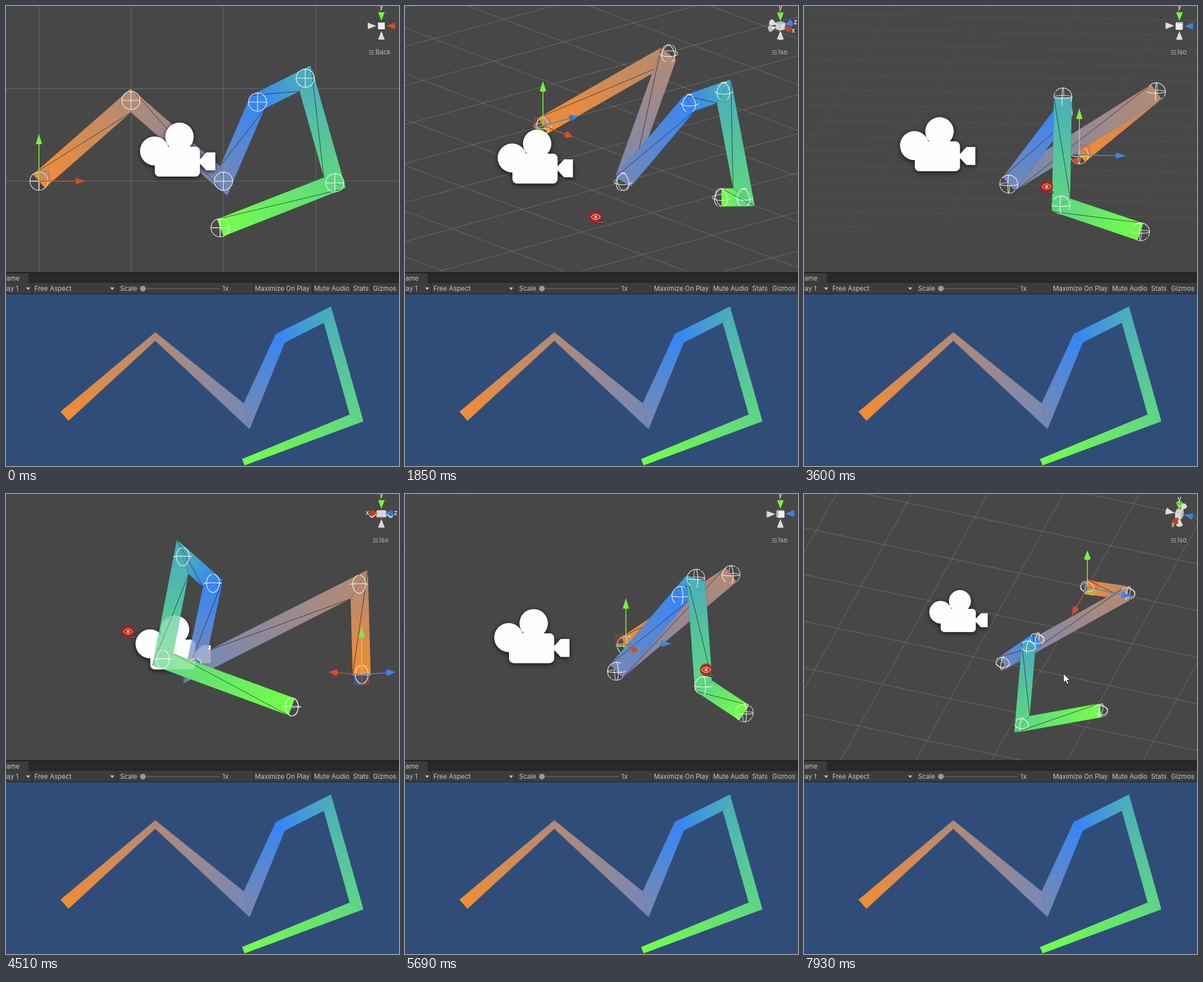
An HTML page with a canvas for the animation above (8 s loop, 692 by 809 pixels).

```html
<!DOCTYPE html>
<html lang="en">
<head>
<meta charset="utf-8">
<title>Line orbit</title>
<style>
html, body { margin: 0; width: 100%; height: 100%; overflow: hidden; background: #282828; }
canvas { display: block; }
</style>
</head>
<body>
<canvas id="stage" width="692" height="809"></canvas>
<script>
const ctx = document.getElementById('stage').getContext('2d');
const LOOP = 8000, CELL = 162.5, CX = 346, CY = 230, NEAR = 505;
const FONT = 'Inter, Roboto, sans-serif';

// World units are pixels at zoom 1; the first point is the origin.
const POINTS = [[0, 0, 0], [162, 142, 153], [325, 0, -91.6], [385, 139, 11],
  [469, 181, 19], [521, -3, 21], [319, -82, 141]];
const PIVOT = [288, 78, -110];
const CAMERA = [244, 55.5, -226];
const AXES = [[1, 0, 0], [0, 1, 0], [0, 0, 1]];
const AXIS_COLORS = ['#d24e28', '#78f23c', '#3f82e6'];
const STOPS = [[242, 140, 52], [55, 134, 245], [115, 255, 72]];

// Pointer stops (time, x, y). While it drags, the pointer turns the view.
const POINTER = [[0, 650, 830], [870, 608, 268], [940, 608, 268], [1850, 336, 371],
  [2200, 240, 347], [2530, 586, 345], [2720, 586, 345], [3530, 443, 321], [4510, 215, 242],
  [4900, 300, 195], [5690, 530, 309], [6000, 677, 490], [6490, 570, 325], [6800, 615, 330],
  [7500, 294, 315], [7900, 457, 316], [LOOP, 457, 316]];
const DRAGS = [[940, 2200], [2720, 6000], [6800, 7500]];
const DEG_PER_PX = .182;

const rad = deg => deg * Math.PI / 180;
const clamp = v => Math.max(0, Math.min(1, v));
const smooth = v => clamp(v) ** 2 * (3 - 2 * clamp(v));
let view;

function slope(i, n) {
  const rise = k => (POINTER[k + 1][n] - POINTER[k][n]) / (POINTER[k + 1][0] - POINTER[k][0]);
  if (i === 0 || i === POINTER.length - 1) return 0;
  const a = rise(i - 1), b = rise(i);
  return a * b > 0 ? 2 * a * b / (a + b) : 0;
}

// Monotone curve through the pointer stops.
function pointerAt(t) {
  const i = Math.max(0, POINTER.findIndex(p => p[0] > t) - 1);
  const a = POINTER[i], b = POINTER[i + 1], span = b[0] - a[0], f = (t - a[0]) / span;
  return [1, 2].map(n => a[n] + (b[n] - a[n]) * smooth(f)
    + span * f * (1 - f) * ((1 - f) * slope(i, n) - f * slope(i + 1, n)));
}

function viewOf(yaw, pitch, zoom) {
  return { yaw, zoom, c: Math.cos(rad(yaw)), s: Math.sin(rad(yaw)),
    cp: Math.cos(rad(pitch)), sp: Math.sin(rad(pitch)) };
}

function viewAt(t) {
  let yaw = 0, pitch = 0;
  for (const [from, to] of DRAGS) {
    if (t <= from) break;
    const a = pointerAt(from), b = pointerAt(Math.min(t, to));
    yaw -= (b[0] - a[0]) * DEG_PER_PX;
    pitch += (b[1] - a[1]) * DEG_PER_PX;
  }
  return viewOf(yaw, pitch, 1 - .224 * smooth((t - 7550) / 350));
}

// Screen x, screen y and nearness of a world direction.
function turn([x, y, z]) {
  const near = x * view.s - z * view.c;
  return [x * view.c + z * view.s, near * view.sp - y * view.cp, near * view.cp + y * view.sp];
}

function project(p) {
  const [x, y, d] = turn(p.map((v, i) => v - PIVOT[i]));
  return [CX + x * view.zoom, CY + y * view.zoom, d];
}

function path(points, closed) {
  ctx.beginPath();
  points.forEach(p => ctx.lineTo(p[0], p[1]));
  if (closed) ctx.closePath();
}

function stroke(points, color, width = 1, closed = false) {
  path(points, closed);
  ctx.strokeStyle = color;
  ctx.lineWidth = width;
  ctx.stroke();
}

function fill(points, color) {
  path(points, true);
  ctx.fillStyle = color;
  ctx.fill();
}

function disc(x, y, r, color) {
  ctx.beginPath();
  ctx.arc(x, y, r, 0, 7);
  ctx.fillStyle = color;
  ctx.fill();
}

function rect(x, y, w, h, color) {
  ctx.fillStyle = color;
  ctx.fillRect(x, y, w, h);
}

function text(str, x, y, align = 'left', size = 11.5, color = '#c6c6c6') {
  ctx.font = `${size}px ${FONT}`;
  ctx.textAlign = align;
  ctx.textBaseline = 'middle';
  ctx.fillStyle = color;
  ctx.fillText(str, x, y);
}

// The gradient spreads evenly over the points.
function pointColor(i) {
  const pos = i / (POINTS.length - 1) * 2, k = Math.min(1, Math.floor(pos));
  return `rgb(${STOPS[k].map((v, n) => Math.round(v + (STOPS[k + 1][n] - v) * (pos - k)))})`;
}

// Left and right rims of a mitred ribbon; sharp turns swap sides.
function ribbon(pts, halfAt) {
  const left = [], right = [];
  let side = 1, prev = null;
  pts.forEach((p, i) => {
    let next = null;
    if (i < pts.length - 1) {
      const dx = pts[i + 1][0] - p[0], dy = pts[i + 1][1] - p[1], len = Math.hypot(dx, dy) || 1;
      next = [side * dy / len, -side * dx / len];
      if (prev && prev[0] * next[0] + prev[1] * next[1] < -.7) {
        side = -side;
        next = [-next[0], -next[1]];
      }
    }
    const a = prev || next, b = next || prev;
    const mx = a[0] + b[0], my = a[1] + b[1];
    const reach = halfAt(i) / (a[0] * mx + a[1] * my);
    left.push([p[0] + mx * reach, p[1] + my * reach]);
    right.push([p[0] - mx * reach, p[1] - my * reach]);
    prev = next;
  });
  return pts.slice(1).map((b, i) => ({ corners: [left[i], left[i + 1], right[i + 1], right[i]],
    draw() {
      const g = ctx.createLinearGradient(pts[i][0], pts[i][1], b[0], b[1]);
      g.addColorStop(0, pointColor(i));
      g.addColorStop(1, pointColor(i + 1));
      fill(this.corners, g);
    } }));
}

function drawGrid() {
  const far = 14 * CELL;
  const flat = clamp(1 - view.yaw / 6) * .19;
  const tilted = clamp((Math.abs(view.sp) - .13) / .1) * .19;
  const lines = (u, v, alpha) => {
    for (let p = -far; p <= far; p += CELL) {
      for (const [a, b] of [[u, v], [v, u]]) {
        const ends = [-far, far].map(q => project(AXES[a].map((w, i) => w * p + AXES[b][i] * q)));
        stroke(ends, `rgba(255,255,255,${alpha})`);
      }
    }
  };
  if (flat > 0) lines(0, 1, flat);
  if (tilted <= 0) return;
  const edge = CY + (PIVOT[1] * view.cp + NEAR * view.sp) * view.zoom;
  ctx.save();
  ctx.beginPath();
  ctx.rect(0, edge, 692, view.sp > 0 ? -1000 : 1000);
  ctx.clip();
  lines(0, 2, tilted);
  ctx.restore();
}

function drawSphere(point, front) {
  const [x, y] = project(point), r = 16 * view.zoom, axes = AXES.map(turn);
  ctx.beginPath();
  for (const [m, n] of [[0, 1], [1, 2], [0, 2]]) {
    let pen = false;
    for (let k = 0; k <= 48; k++) {
      const u = Math.cos(k * Math.PI / 24), v = Math.sin(k * Math.PI / 24);
      const [dx, dy, d] = axes[m].map((a, i) => a * u + axes[n][i] * v);
      const shown = (d >= -1e-6) === front;
      if (shown) ctx[pen ? 'lineTo' : 'moveTo'](x + dx * r, y + dy * r);
      pen = shown;
    }
  }
  ctx.strokeStyle = `rgba(255,255,255,${front ? .92 : .75})`;
  ctx.lineWidth = 1.15;
  ctx.stroke();
}

function drawCamera(alpha) {
  const [x, y] = project(CAMERA);
  ctx.save();
  ctx.translate(x, y);
  ctx.scale(view.zoom, view.zoom);
  ctx.globalAlpha = alpha;
  if (alpha === 1) {
    ctx.shadowColor = 'rgba(0,0,0,.75)';
    ctx.shadowBlur = 8;
    ctx.shadowOffsetY = 2;
  }
  ctx.fillStyle = '#fdfdfd';
  ctx.beginPath();
  ctx.arc(3.5, -22.5, 25, 0, 7);
  ctx.closePath();
  ctx.moveTo(-15, 2.5);
  ctx.arc(-40.5, 2.5, 25.5, 0, 7);
  ctx.closePath();
  ctx.roundRect(-40, -5, 79.5, 52.5, 8);
  ctx.moveTo(39, 18);
  [[51, 5], [66.5, 5], [66.5, 36.5], [51, 36.5], [39, 24]].forEach(p => ctx.lineTo(...p));
  ctx.closePath();
  ctx.fill();
  ctx.restore();
}

function drawObjects() {
  const pts = POINTS.map(project);
  const mids = pts.slice(1).map((p, i) => (p[2] + pts[i][2]) / 2);
  const items = ribbon(pts, () => 16 * view.zoom).map((part, i) => ({ depth: mids[i], draw() {
    part.draw();
    stroke(part.corners, 'rgba(0,0,0,.16)', .7, true);
    stroke([part.corners[0], part.corners[2]], 'rgba(15,20,20,.75)', .9);
  } }));
  pts.forEach((p, i) => {
    const near = [p[2], mids[i - 1], mids[i]].filter(d => d !== undefined);
    items.push({ depth: Math.max(...near) + 1, draw: () => drawSphere(POINTS[i], true) });
    items.push({ depth: Math.min(...near) - 1, draw: () => drawSphere(POINTS[i], false) });
  });
  items.push({ depth: project(CAMERA)[2], draw: () => drawCamera(1) });
  items.sort((a, b) => a.depth - b.depth).forEach(item => item.draw());
  drawCamera(.3);
}

function cone(x, y, dir, base, tip, r, color) {
  const bx = x + dir[0] * base, by = y + dir[1] * base;
  const len = Math.hypot(dir[0], dir[1]) || 1, nx = -dir[1] / len * r, ny = dir[0] / len * r;
  const cap = shade => {
    ctx.beginPath();
    ctx.ellipse(bx, by, Math.abs(dir[2]) * r, r, Math.atan2(dir[1], dir[0]), 0, 7);
    ctx.fillStyle = shade;
    ctx.fill();
  };
  fill([[bx + nx, by + ny], [bx - nx, by - ny], [x + dir[0] * tip, y + dir[1] * tip]], color);
  cap(color);
  if ((tip - base) * dir[2] < 0) cap('rgba(0,0,0,.12)');
}

function drawHandle() {
  const [x, y] = project(POINTS[0]), dirs = AXES.map(turn);
  const facing = dirs.map(d => d[2] < -.001 ? -18 : 18);
  for (let i = 0; i < 3; i++) {
    const a = (i + 1) % 3, b = (i + 2) % 3;
    const at = (u, v) => [0, 1].map(n =>
      (n ? y : x) + dirs[a][n] * facing[a] * u + dirs[b][n] * facing[b] * v);
    const corners = [at(0, 0), at(1, 0), at(1, 1), at(0, 1)];
    ctx.globalAlpha = .2;
    fill(corners, AXIS_COLORS[i]);
    ctx.globalAlpha = .8;
    stroke(corners, AXIS_COLORS[i], 1, true);
    ctx.globalAlpha = 1;
  }
  dirs.map((d, i) => ({ d, i })).sort((p, q) => p.d[2] - q.d[2]).forEach(({ d, i }) => {
    if (Math.abs(d[2]) > .995) return;
    stroke([[x, y], [x + d[0] * 66, y + d[1] * 66]], AXIS_COLORS[i], 1.6);
    cone(x, y, d, 65, 83, 5.5, AXIS_COLORS[i]);
  });
}

function drawCube(x, y, dirs, half) {
  dirs.forEach((d, i) => {
    const sign = d[2] < 0 ? -1 : 1, a = dirs[(i + 1) % 3], b = dirs[(i + 2) % 3];
    const at = (u, v) => [x + half * (d[0] * sign + a[0] * u + b[0] * v),
      y + half * (d[1] * sign + a[1] * u + b[1] * v)];
    const light = Math.round(165 + 75 * Math.abs(d[2]));
    fill([at(-1, -1), at(1, -1), at(1, 1), at(-1, 1)], `rgb(${light},${light},${light})`);
  });
}

function drawCompass(label) {
  const x = 661, y = 35, dirs = AXES.map(turn);
  const parts = [{ depth: 0, draw: () => drawCube(x, y, dirs, 6) }];
  dirs.forEach((dir, i) => [1, -1].forEach(sign => {
    const d = dir.map(v => v * sign);
    if (Math.abs(d[2]) > .96) return;
    parts.push({ depth: d[2], draw() {
      cone(x, y, d, 24, 9, 5.8, sign > 0 ? AXIS_COLORS[i] : '#dcdcdc');
      if (sign > 0) text('xyz'[i], x + d[0] * 35, y + d[1] * 34, 'center', 12, '#fff');
    } });
  }));
  parts.sort((a, b) => a.depth - b.depth).forEach(p => p.draw());
  const left = label === 'Iso' ? 646 : 639;
  for (let n = 0; n < 3; n++) rect(left, 78 + n * 3, 9, 1, '#aaa');
  text(label, left + 11.5, 82, 'left', 11.5, '#bdbdbd');
}

function drawToolbar() {
  rect(0, 468, 692, 39, '#282828');
  rect(0, 468, 692, 1.5, '#1c1c1c');
  rect(0, 470, 40, 18, '#3c3c3c');
  rect(0, 487, 692, 19, '#3c3c3c');
  rect(0, 506, 692, 1, '#242424');
  [46, 195, 436, 539, 607, 643].forEach(x => rect(x, 487, 1, 19, '#262626'));
  text('Game', 24, 480, 'right');
  text('Display 1', 22, 497.5, 'right');
  text('Free Aspect', 50, 497.5);
  text('Scale', 201, 497.5);
  text('1x', 381, 497.5);
  [['Maximize On Play', 486.5], ['Mute Audio', 573.5], ['Stats', 625], ['Gizmos', 667]]
    .forEach(([label, x]) => text(label, x, 497.5, 'center'));
  [39, 187].forEach(x => fill([[x - 3.5, 495], [x + 3.5, 495], [x, 499.5]], '#c4c4c4'));
  rect(241, 496.5, 135, 1.5, '#606060');
  disc(241, 497, 5, '#999');
}

// The game camera sees the same line flat; its width shrinks with distance.
function drawGame() {
  rect(0, 507, 692, 302, '#304d79');
  const pts = POINTS.map(([x, y]) => [103 + x * .987, 721.5 - y * .987]);
  ribbon(pts, i => 10.7 - POINTS[i][2] * .033).forEach(part => part.draw());
}

function drawPointer(x, y, dragging) {
  ctx.save();
  ctx.translate(x, y);
  if (dragging) {
    disc(0, 0, 11, 'rgba(174,30,26,.9)');
    ctx.beginPath();
    ctx.moveTo(-8, 0);
    ctx.quadraticCurveTo(0, -9.5, 8, 0);
    ctx.quadraticCurveTo(0, 9.5, -8, 0);
    ctx.strokeStyle = '#f0a79b';
    ctx.lineWidth = 1.3;
    ctx.stroke();
    disc(0, 0, 2.8, '#f0a79b');
    rect(3, 8, 9, 4, '#222');
    [4, 7, 10].forEach(left => rect(left, 9, 1.5, 1.5, '#fff'));
  } else {
    const arrow = [[0, 0], [0, 16], [3.7, 12.6], [6.4, 18.5], [9, 17.3], [6.4, 11.6], [11.3, 11.3]];
    fill(arrow, '#fff');
    stroke(arrow, '#222', 1, true);
  }
  ctx.restore();
}

function render(t) {
  view = viewAt(t);
  ctx.save();
  ctx.beginPath();
  ctx.rect(0, 0, 692, 468);
  ctx.clip();
  rect(0, 0, 692, 468, '#474747');
  drawGrid();
  drawObjects();
  drawHandle();
  drawCompass(t < DRAGS[0][0] ? 'Back' : 'Iso');
  ctx.restore();
  drawToolbar();
  drawGame();
  drawPointer(...pointerAt(t), DRAGS.some(([from, to]) => t >= from && t < to));
}

const start = performance.now();
function tick() {
  render((performance.now() - start) % LOOP);
  requestAnimationFrame(tick);
}
tick();
</script>
</body>
</html>
```
